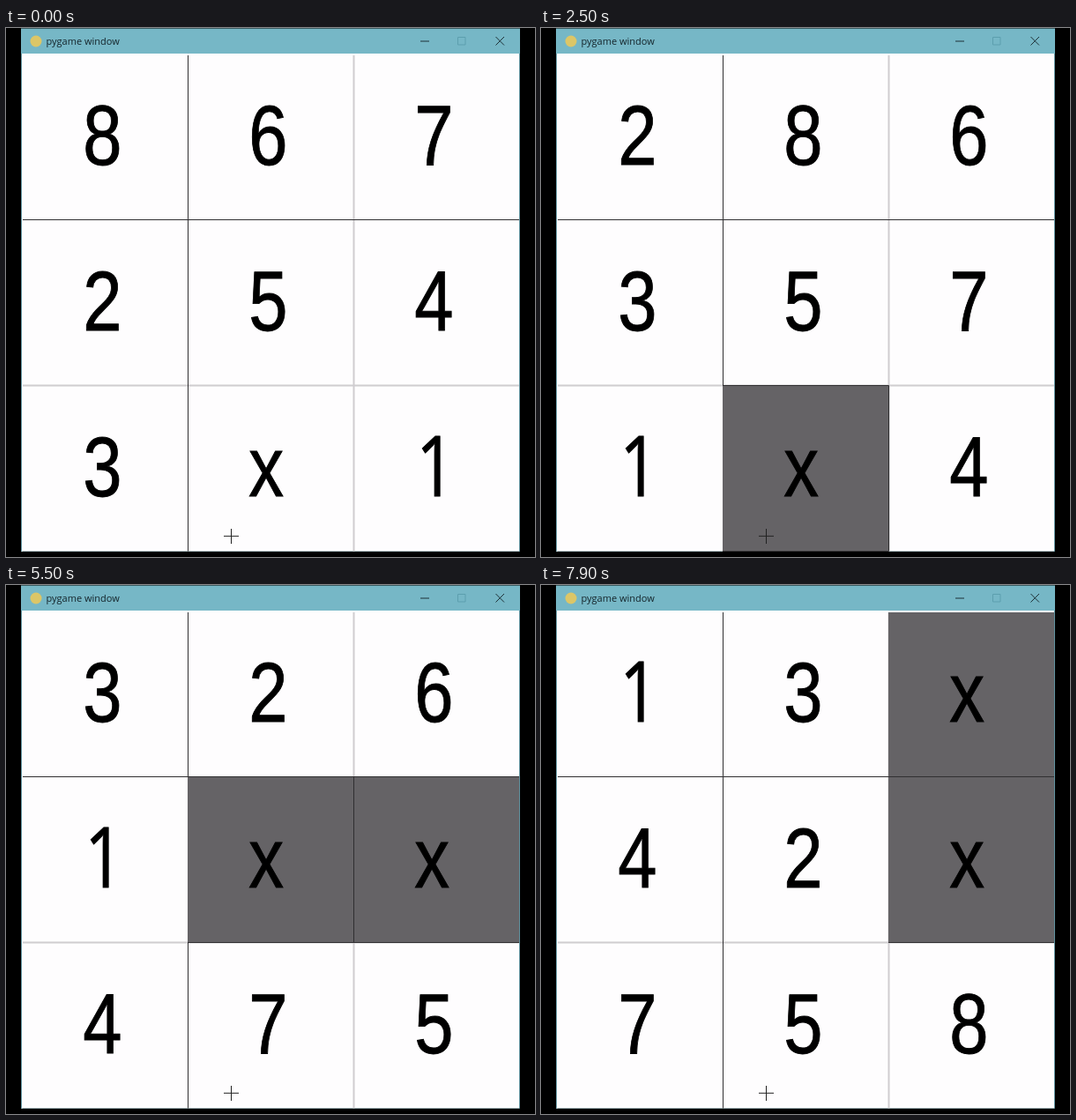
These frames come from a looping animation (600x600 px, 8 s). An HTML page:

```html
<!DOCTYPE html>
<html lang="en">
<head>
<meta charset="utf-8">
<title>Sliding puzzle</title>
<style>
  html, body { margin: 0; width: 100%; height: 100%; overflow: hidden; background: #000; }
  svg { display: block; width: 100vw; height: 100vh; }
  .title { font: 11px "Open Sans", "Noto Sans", sans-serif; fill: #14242a; }
  .digit { font: 97px "Liberation Sans", Arial, sans-serif; fill: #000; stroke: #000; stroke-width: .9; }
  .one { font: 95px "Open Sans", "Noto Sans", sans-serif; }
  .shade { fill: #656366; }
  .edge { fill: none; stroke: #302f31; }
</style>
</head>
<body>
<svg viewBox="0 0 600 600">
  <rect width="600" height="600" fill="#000"/>
  <rect x="17" y=".5" width="566" height="593" fill="#76b7c6"/>
  <rect x="18" y="29" width="564" height="564.5" fill="#fefdfe"/>

  <circle cx="34" cy="15" r="6.5" fill="#dcc667"/>
  <text class="title" x="45.5" y="19.3">pygame window</text>
  <g fill="none" stroke="#1d3036">
    <path d="M470 15h10M555.5 10l9.5 9.500m0-9.500l-9.500 9.500"/>
    <path d="M512.5 10.5h8.500v8.500h-8.500z" stroke="#5c9fae"/>
  </g>

  <g fill="none">
    <path d="M394.5 29V593.5M18 405.5H582" stroke="#cfcdd0" stroke-width="2"/>
    <path d="M206.5 29V593.5M18 217.5H582" stroke="#302f31"/>
  </g>
  <g id="shades"></g>
  <g id="edges"></g>
  <g fill="none">
    <path d="M18 593.500V30H582" stroke="#fefdfe" stroke-width="2"/>
    <path d="M17.5 29V593.500M582.500 29V593.500" stroke="#5f929e"/>
  </g>
  <g id="labels"></g>
  <path d="M247 576.300h17M255.500 568v17" stroke="#222" fill="none"/>
</svg>
<script>
const LOOP = 8000, STEP = 100;
const CELL = 188;
const CELL_DELAY = 34; // cells are repainted one after another

const START = "8672543x1";
const BLANK_PATH = "7852103678541036785410367852";
// [move, time its repaint begins]
const PACE = [[1, -100], [6, 1450], [12, 3215], [19, 5353], [23, 6650], [24, 7000], [27, 7790]];

const svgNode = (tag, attrs, parentId) => {
  const node = document.createElementNS("http://www.w3.org/2000/svg", tag);
  for (const key in attrs) node.setAttribute(key, attrs[key]);
  return document.getElementById(parentId).appendChild(node);
};

function buildStates() {
  const states = [[...START]];
  for (let i = 1; i < BLANK_PATH.length; i++) {
    const next = [...states[i - 1]];
    const from = +BLANK_PATH[i - 1], to = +BLANK_PATH[i];
    [next[from], next[to]] = [next[to], next[from]];
    states.push(next);
  }
  return states;
}

function moveTime(move) {
  if (move < 1) return -Infinity;
  const i = PACE.findIndex(([m]) => m >= move);
  const [m1, t1] = PACE[i];
  if (m1 === move) return t1;
  const [m0, t0] = PACE[i - 1];
  return t0 + (t1 - t0) * (move - m0) / (m1 - m0);
}

function makeCell(_, i) {
  const x = CELL * (i % 3), y = CELL * Math.floor(i / 3);
  return {
    x, y,
    shade: svgNode("rect", { class: "shade", x: 18 + x, y: 29 + y, width: CELL, height: CELL }, "shades"),
    // top, right and bottom sides
    edge: svgNode("path", {
      class: "edge", d: `M${18 + x} ${29.5 + y}h${CELL + 0.5}v${CELL}h${-CELL - 0.5}`
    }, "edges"),
    label: svgNode("text", {}, "labels")
  };
}

const states = buildStates();
const times = states.map((_, move) => moveTime(move));
const cells = Array.from({ length: 9 }, makeCell);

function paint({ x, y, shade, edge, label }, value, shaded) {
  const isOne = value === "1";
  const left = 87.3 + x + (isOne ? 1.8 : 0);
  label.textContent = value;
  label.setAttribute("class", isOne ? "digit one" : "digit");
  label.setAttribute("transform", `translate(${left} ${155 + y}) scale(.82 1)`);
  shade.style.display = edge.style.display = shaded ? "" : "none";
}

function draw(time) {
  cells.forEach((cell, i) => {
    let move = states.length - 1;
    while (times[move] + i * CELL_DELAY > time) move--;
    const value = states[move][i];
    paint(cell, value, value === "x" && move > 0);
  });
}

let shown = -1;
function tick() {
  const time = Math.floor(performance.now() % LOOP / STEP) * STEP;
  if (time !== shown) draw(shown = time);
  requestAnimationFrame(tick);
}
tick();
</script>
</body>
</html>
```
